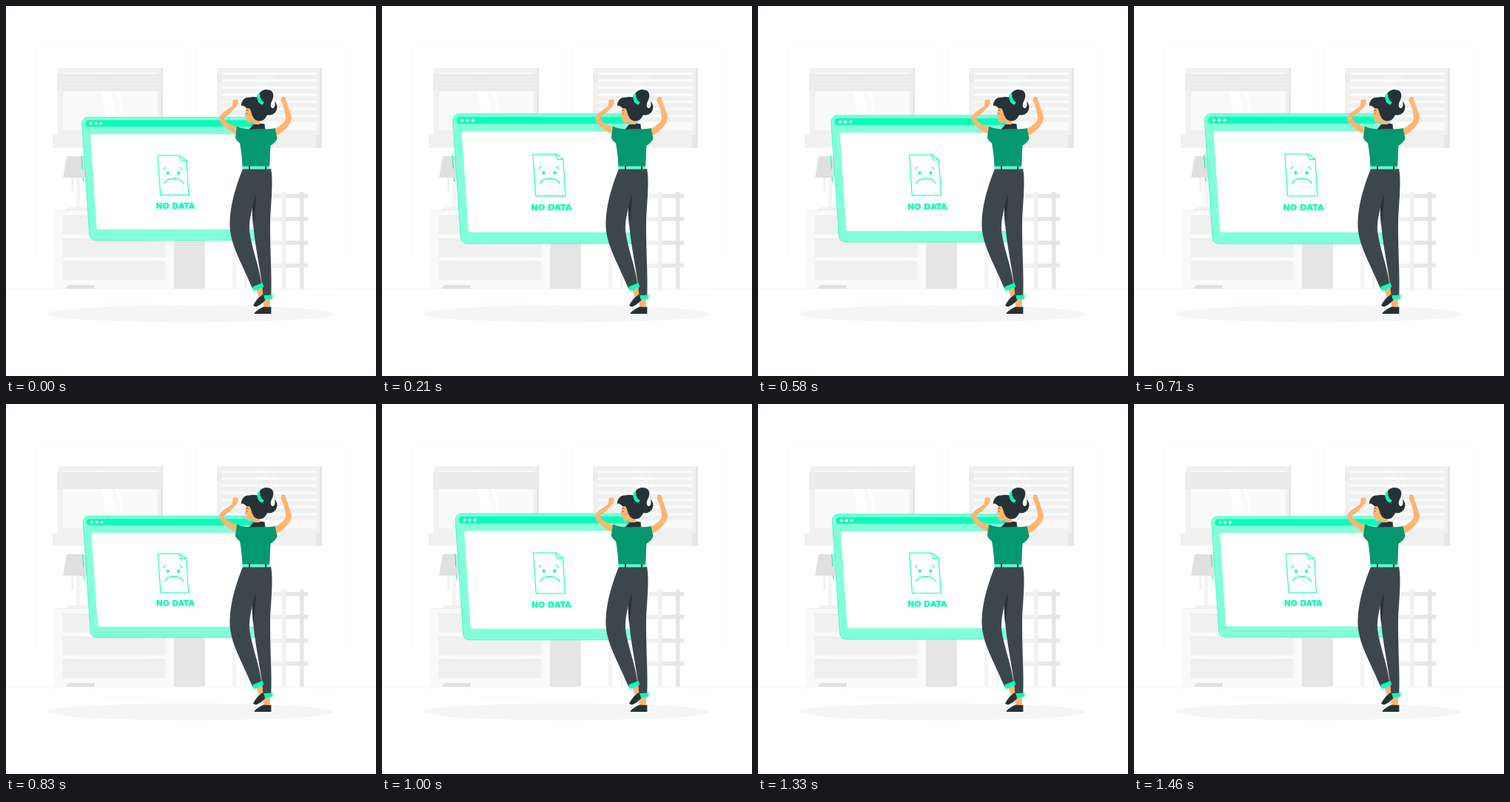
Animation of 500 by 500 pixels, one loop 1.5 s. Source, as an HTML page with a canvas:

```html
<!DOCTYPE html>
<html lang="en">
<head>
<meta charset="utf-8">
<title>No data</title>
<style>
  html, body { margin: 0; width: 100%; height: 100%; overflow: hidden; background: #fff; }
  canvas { display: block; width: 500px; height: 500px; }
</style>
</head>
<body>
<canvas id="stage"></canvas>
<script>
const LOOP = 1500, FPS = 24;
const MAIN = '#08fdb8', LIGHT = '#83fedb', SHIRT = '#059770';
const DARK = '#263238', PANTS = '#3c474c', SKIN = '#ffb573';

const canvas = document.getElementById('stage');
const ctx = canvas.getContext('2d');
const ratio = window.devicePixelRatio || 1;
canvas.width = canvas.height = 500 * ratio;

function rect(color, x1, y1, x2, y2) {
  ctx.fillStyle = color;
  ctx.fillRect(x1, y1, x2 - x1, y2 - y1);
}

function shape(color, d) {
  ctx.fillStyle = color;
  ctx.fill(new Path2D(d));
}

function line(color, width, d) {
  ctx.strokeStyle = color;
  ctx.lineWidth = width;
  ctx.stroke(new Path2D(d));
}

function dot(color, x, y, rx, ry = rx) {
  ctx.fillStyle = color;
  ctx.beginPath();
  ctx.ellipse(x, y, rx, ry, 0, 0, Math.PI * 2);
  ctx.fill();
}

// Slanted panel with rounded corners; the lower edge is shifted right by lean.
function panel(x1, y1, x2, y2, lean, radius) {
  const corners = [[x1, y1], [x2, y1], [x2 + lean, y2], [x1 + lean, y2]];
  ctx.beginPath();
  ctx.moveTo((x1 + x2) / 2, y1);
  for (let i = 1; i <= 4; i++) {
    ctx.arcTo(...corners[i % 4], ...corners[(i + 1) % 4], radius);
  }
  ctx.closePath();
}

function drawWindow(x) {
  rect('#f0f0f0', x, 84, x + 142, 176);
  rect('#e6e6e6', x + 139, 84, x + 142, 176);
  rect('#fafafa', x + 7, 90, x + 135, 168);
  shape('#fff', `M${x + 53} 90h14l17 78h-14zM${x + 73} 90h4l17 78h-4z`);
  rect('#f0f0f0', x - 7, 174, x + 142, 191.5);
  rect('#e6e6e6', x + 134, 174, x + 142, 191.5);
}

function drawRoom() {
  ctx.strokeStyle = '#fafafa';
  ctx.lineWidth = 1;
  for (const x of [39.5, 255.5]) {
    ctx.beginPath();
    ctx.roundRect(x, 55.5, 203, 282, 3);
    ctx.stroke();
  }

  drawWindow(70);
  rect('#ebebeb', 69, 92, 210, 115);
  for (let y = 95; y < 115; y += 5) rect('#eeeeee', 69, y, 210, y + 1);

  drawWindow(285);
  for (let y = 93; y < 155; y += 9.6) rect('#f0f0f0', 285, y, 421, y + 6);
  rect('#ebebeb', 285, 92, 292, 104);

  // Lamp
  rect('#f0f0f0', 88.5, 232, 91, 252);
  rect('#f5f5f5', 95, 232, 100, 273);
  shape('#e0e0e0', 'M82 203H113L119 232H77Z');
  shape('#f0f0f0', 'M84 272H112L116 277H80Z');

  // Dresser
  rect('#e6e6e6', 227, 277, 269, 382);
  rect('#fafafa', 65, 276, 227, 382);
  line('#f2f2f2', 1, 'M65.5 382V276.5H227');
  for (const y of [283, 314, 345]) {
    rect('#f0f0f0', 76.5, y, 216, y + 25.5);
    shape('#ebebeb', `M76.5 ${y}H99L102 ${y + 2}H189L192 ${y}H216V${y + 1}H193L190 ${y + 3}H101L98 ${y + 1}H76.5Z`);
  }
  shape('#e0e0e0', 'M85 377H120V382H80Z');

  // Shelf
  rect('#f5f5f5', 306, 318, 311, 382);
  rect('#f5f5f5', 322, 318, 326, 382);
  rect('#e6e6e6', 397, 251, 402.5, 382);
  for (const y of [254, 285, 317, 348]) {
    rect('#f0f0f0', 355, y, 380, y + 6);
    rect('#e6e6e6', 378, y, 408, y + 5.5);
  }
  rect('#f0f0f0', 373, 251, 378.5, 382);

  line('#ebebeb', 0.5, 'M0 382.5H500');
  line('#f5f5f5', 0.7, 'M52 391.5H70M135 395.5H196M412 390.5H448M108 388.5H130');
  dot('#f5f5f5', 249.5, 416, 194, 11.5);
}

function drawFile() {
  ctx.lineCap = ctx.lineJoin = 'round';
  line(MAIN, 1, 'M234 202.5H205.5L209 255H246.5L243.5 209L234 202.5L236.5 209.5L243.5 209');
  line(MAIN, 1.1, 'M213 221.5Q214 219 216 218.5M235 218.5Q237 219.5 238 221.5');
  line(MAIN, 1.2, 'M214.5 239.5C218 231 235 231 239.5 239.5');
  dot(MAIN, 219, 226, 2);
  dot(MAIN, 233, 226, 2);
  ctx.fillStyle = MAIN;
  ctx.font = 'bold 10.4px "DejaVu Sans", sans-serif';
  ctx.textAlign = 'center';
  ctx.fillText('NO DATA', 228.7, 273);
  line(MAIN, 0.4, '');
  ctx.strokeText('NO DATA', 228.7, 273);
}

function drawBrowser(scale) {
  ctx.save();
  ctx.translate(226, 233.5);
  ctx.scale(scale, scale);
  ctx.translate(-226, -233.5);

  panel(104.2, 151.8, 336, 315, 11, 8);
  ctx.fillStyle = LIGHT;
  ctx.fill();
  ctx.strokeStyle = MAIN;
  ctx.lineWidth = 0.6;
  ctx.stroke();

  panel(109, 155.6, 334, 164.2, 0.6, 4);
  ctx.fillStyle = MAIN;
  ctx.fill();
  for (const x of [116.5, 123.2, 130]) dot('#fff', x, 160, 1.9);

  panel(116, 174.2, 328, 300.6, 8.5, 3);
  ctx.fillStyle = '#fff';
  ctx.fill();

  line('#06f0af', 1, 'M104.2 203.5L105.4 220.5M106 231.5L106.6 237');
  drawFile();
  ctx.restore();
}

function drawLegs() {
  shape(SKIN, 'M338 383L346 380L350 390L342 394ZM347.5 395H357V408H348Z');
  shape(DARK, 'M334 405C337 398 342 393 347 390L354 387L355.3 392C350 399 344 404 338 406.5Z');
  shape(DARK, 'M335.5 415C339 411 344 408.5 348 406.5L358.3 407V416H336Z');

  shape(PANTS, 'M330 220H358C361 235 359 255 357 290C356.5 330 359.5 360 358.3 391H347.5C345 360 337 330 334 295Z');
  shape(DARK, 'M338 254C337.5 270 336 284 334 298L332.5 276L335 260Z');
  shape(PANTS, 'M320 220H345C342 240 338 253 335 264C331 280 328.5 290 329 304C332 328 342 350 345.5 377L333 382C320 350 306 328 303 304C300 274 312 240 320 220Z');
  shape(MAIN, 'M333 379.5L346.5 374L348.3 379.5L335 385.5ZM348 391L361 390.5L360 395.5L350 397Z');
}

function drawArms() {
  shape(SKIN, 'M312 163C303 161 296 156 294.5 151.5C300 147 306 142 310 137L313.5 132L313.7 127L309 126L306.5 128L306 135C299 140 289 146 288 151C288 158 299 168 311 173Z');
  shape(SKIN, 'M362 166C370 163 377 157 378 152C378 146 376 140 374 133L371.3 127.5L372.5 123L377 123L379.5 131C382 138 386 147 386 152C385 160 375 171 364 176Z');
}

function drawTorso() {
  shape(SHIRT, 'M312 162.5C319 166 325 166.5 331 166H350C356 166.5 360 166 363.5 165L366.5 179C364 184 361 187 357.5 188.5C356.5 198 357 208 356 218H319.5C319 206 318 196 316 185.5C313 183 311 181 309.8 178Z');
  shape(DARK, 'M328.8 166.5L334 160C340 158.5 345 158.5 349.5 159.5L350 166Z');
  rect('#5cffd0', 319.5, 216.5, 356, 220.5);
  rect(DARK, 328, 216, 330, 221);
  rect(DARK, 350, 216, 352, 221);
}

function drawHead() {
  shape(SKIN, 'M325 137C323.5 141 324 144 322.5 148.5L324.5 150C324.5 154 325.5 158 329 158.5L333 156.5L336 160H343V150L333 136Z');
  line(DARK, 0.8, 'M324.5 141.5L327.5 140.5M325.7 144.5V146');
  shape(DARK, 'M317.8 135C318 128 322 123 329 123.5C334 122 339 122.5 342 125L352 130C357 138 355 148 348 154C342 157 336 155 334 150C331 146 332 141 328.5 138C326 138.5 324 138 323.5 136.5C321 135 320 134 317.8 135Z');
  shape(DARK, 'M342 120C343.5 113 353 111 359 115C363 119 361 126 358.5 130C356.5 136 359 139.5 362 137.5C364 136 364 131 362.5 128.5C368 133 367 140 363.5 144C359 149 352 148 347 144Z');
  shape(MAIN, 'M341 118.5C338 122 339 131 346 133.5L349 130.5C345 128 343 125 343.5 120Z');
}

const KEYS = [[0, 0], [0.1, 1], [0.3, 0], [0.5, 0.78], [0.6, 0], [0.8, 1], [1, 0]];

function heartbeat(phase) {
  const next = Math.max(1, KEYS.findIndex(([at]) => at >= phase));
  const [t1, v1] = KEYS[next - 1], [t2, v2] = KEYS[next];
  const ease = (1 - Math.cos(Math.PI * (phase - t1) / (t2 - t1))) / 2;
  return 1 + 0.1 * (v1 + (v2 - v1) * ease);
}

function render(now) {
  const steps = LOOP * FPS / 1000;
  const step = Math.min(steps - 1, Math.floor((now % LOOP + 4) * FPS / 1000));
  ctx.setTransform(ratio, 0, 0, ratio, 0, 0);
  rect('#fff', 0, 0, 500, 500);
  drawRoom();
  drawBrowser(heartbeat((step + 1) / steps));
  drawLegs();
  drawArms();
  drawTorso();
  drawHead();
}

let start;
function tick(now) {
  start ??= now;
  render(now - start);
  requestAnimationFrame(tick);
}
render(0);
requestAnimationFrame(tick);
</script>
</body>
</html>
```
